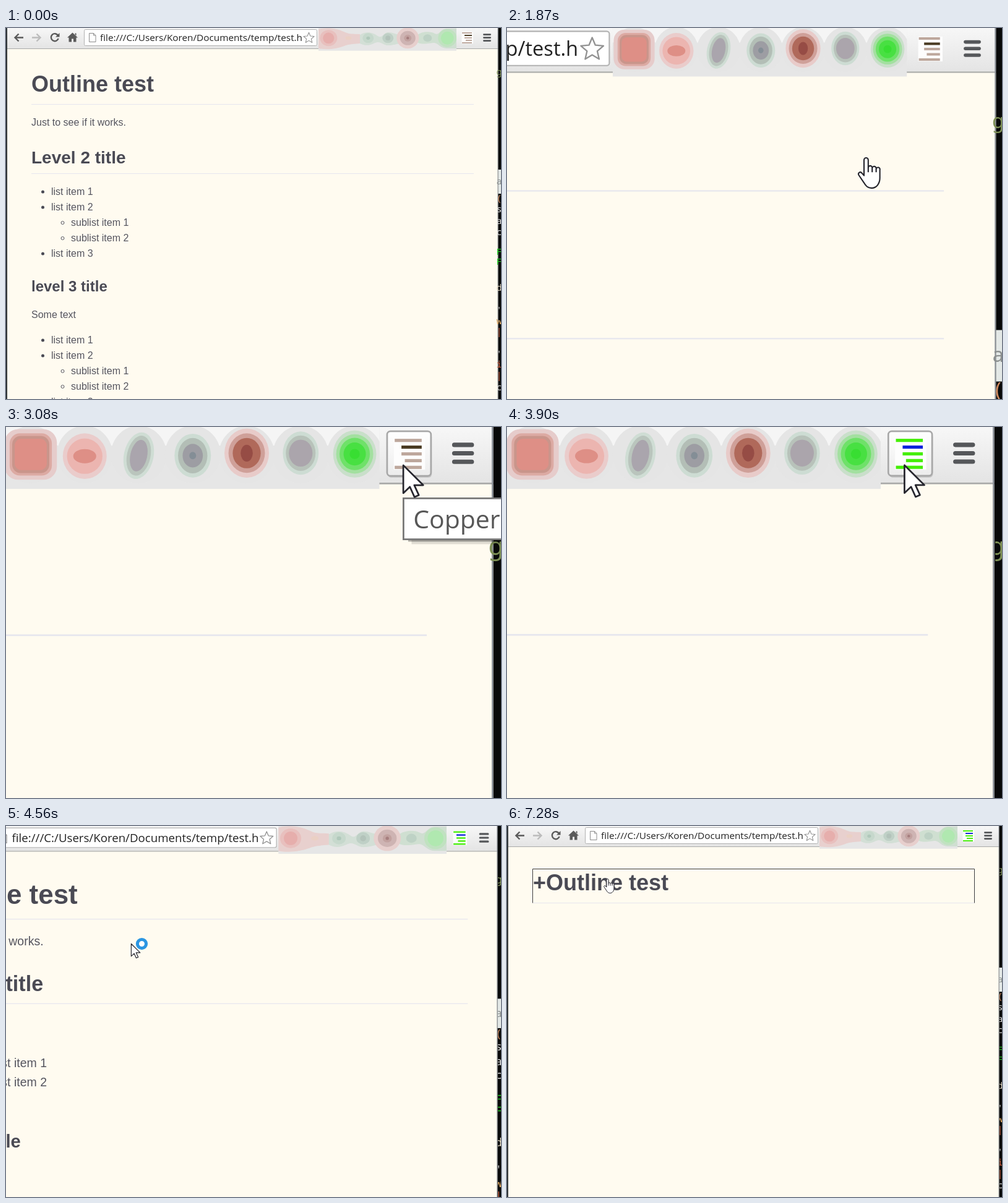
An HTML page that plays this animation: 800x600 px, repeating every 8000 ms.

```html
<!DOCTYPE html>
<html lang="en">
<head>
<meta charset="utf-8">
<title>Outline test</title>
<style>
html, body { margin: 0; width: 100%; height: 100%; overflow: hidden; background: #fffbf0; }
svg { display: block; width: 800px; height: 600px; }
.page { font: 16px "Liberation Sans", Arial, sans-serif; fill: #55555f; }
.page .h { font-weight: bold; fill: #4a4a54; }
.h1 { font-size: 36px; }
.h2 { font-size: 28px; }
.h3 { font-size: 24px; }
.rule { fill: #e6e6ee; }
.box { fill: none; stroke: #3c3c40; }
.ui { font: 15.3px "Open Sans", "Noto Sans", sans-serif; fill: #222; }
.tip { font: 15px "Open Sans", "Noto Sans", sans-serif; fill: #575757; }
.term { font: 15px "Noto Sans Mono", monospace; }
.ink { fill: none; stroke: #5a5a5a; stroke-width: 2.4; }
.cur { fill: #fff; stroke: #26262e; stroke-width: 1; stroke-linejoin: round; }
</style>
</head>
<body>
<svg viewBox="0 0 800 600">
  <defs>
    <linearGradient id="bar" x2="0" y2="1"><stop stop-color="#f7f7f7"/><stop offset="1" stop-color="#e4e4e4"/></linearGradient>
    <linearGradient id="btn" x2="0" y2="1"><stop stop-color="#fff"/><stop offset="1" stop-color="#ececec"/></linearGradient>
    <clipPath id="urlClip"><rect x="148" y="3" width="331" height="25"/></clipPath>
    <clipPath id="termClip"><rect x="796" width="4" height="600"/></clipPath>
    <clipPath id="stripClip"><rect x="505" width="223" height="36.8"/></clipPath>
  </defs>
  <g id="scene">
    <rect width="800" height="600" fill="#fffbf0"/>

    <g class="page">
      <g id="h1Open"><text class="h h1" x="41" y="103">Outline test</text><rect class="rule" x="41" y="123" width="715" height="1"/></g>
      <g id="h1Shut">
        <path class="box" d="M41.5 124.5V69.5H755.5V124.5"/><rect class="rule" x="42" y="124" width="713" height="1"/>
        <text class="h h1" x="42" y="104">+Outline test</text>
      </g>
      <g id="body">
        <text x="41" y="158">Just to see if it works.</text>
        <g id="h2Shut">
          <path class="box" d="M41.5 236.5V193.5H755.5V236.5"/><rect class="rule" x="42" y="236" width="713" height="1"/>
          <text class="h h2" x="42" y="220">+Level 2 title</text>
        </g>
        <g id="h2Open">
          <text class="h h2" x="41" y="219">Level 2 title</text>
          <rect class="rule" x="41" y="235" width="715" height="1"/>
          <text class="h h3" x="41" y="426">level 3 title</text>
          <text x="41" y="469">Some text</text>
          <g id="lists"></g>
        </g>
      </g>
    </g>

    <rect width="800" height="33" fill="url(#bar)"/>
    <rect y="33" width="796" height="1" fill="#a9aaa9"/>
    <g class="ink">
      <path d="M28 15.5H15M20.5 9.5l-6 6 6 6"/>
      <path d="M42 15.5H55M49.5 9.5l6 6-6 6" stroke="#bcbcbc"/>
      <path d="M84 12a6 6 0 1 0 .6 5"/>
      <path d="M86.5 8v6.500h-6.500z" fill="#5a5a5a" stroke="none"/>
      <path d="M107.500 7.500l8.500 8h-2.500v7h-4.500v-5h-3v5h-4.500v-7h-2.500zM111.500 8.500h2v4l-2-2z" fill="#5a5a5a" stroke="none"/>
    </g>
    <rect x="126.500" y="2.500" width="376" height="26" rx="2" fill="#fff" stroke="#b2b2b2"/>
    <path d="M134.500 8.500h7l3.500 3.500v10.500h-10.500zM141.500 8.500v3.500h3.500" fill="#fff" stroke="#8c8c8c"/>
    <text class="ui" x="152" y="21" clip-path="url(#urlClip)">file:///C:/Users/Koren/Documents/temp/test.html</text>
    <path id="star" fill="#fff" stroke="#929292" stroke-width="1.100" stroke-linejoin="round"/>

    <g clip-path="url(#stripClip)">
      <rect x="505" width="223" height="37" fill="#e6e6e6"/>
      <g id="soft"></g>
      <g id="vivid"><rect x="505" width="223" height="11" fill="#f5f5f5"/></g>
    </g>

    <g id="hover">
      <rect x="733" y="4" width="26" height="26" rx="2" fill="#000" opacity=".15"/>
      <rect x="732.500" y="2.500" width="26" height="26.500" rx="2" fill="url(#btn)" stroke="#a8a8a8"/>
    </g>
    <rect x="736.500" y="6.500" width="18.500" height="18.800" fill="#fdfdfd"/>
    <g id="bars"></g>
    <path d="M772.300 10.600h10.400M772.300 15.600h10.400M772.300 20.600h10.400" stroke="#55575a" stroke-width="2.600" stroke-linecap="round"/>

    <rect width="2" height="600" fill="#2f3538"/>
    <rect x="794.500" width="1" height="600" fill="#8d939a"/>
    <rect x="795.500" width="5" height="600" fill="#080909"/>
    <rect x="795.500" y="229" width="5" height="39" fill="#e3e8e6"/>
    <g id="term" class="term"></g>

    <g id="tip">
      <rect x="747" y="46" width="80" height="23.500" opacity=".12"/>
      <rect x="745" y="45" width="80" height="23" opacity=".3"/>
      <rect x="742.200" y="42.300" width="110" height="24.300" fill="#fff" stroke="#767676"/>
      <text class="tip" x="748" y="60">Copper Outline</text>
    </g>

    <g id="cursor">
      <path id="arrow" class="cur" d="M0 0V16.500l3.900-3.700 2.700 6 2.600-1.100-2.700-5.900h5.300z"/>
      <circle id="busy" cx="14" r="5.800" fill="#fff" stroke="#2b96e2" stroke-width="4.200"/>
      <g id="hand" class="cur" transform="translate(-6.600 0)">
        <path d="M5 14V2.200a1.600 1.600 0 0 1 3.200 0V8a1.500 1.500 0 0 1 3 .3 1.500 1.500 0 0 1 3 .6 1.400 1.400 0 0 1 2.800 .8V16c0 4-2.500 7.500-6.200 7.500-3 0-4.400-1.500-5.800-4L1 13.600c-.8-1.600 1-2.800 2.200-1.600z"/>
        <path d="M8.200 8v3.500M11.200 8.500v3M14.200 9v2.500" fill="none"/>
      </g>
    </g>
  </g>
</svg>
<script>
const $ = id => document.getElementById(id);

function add(parent, tag, attrs, text) {
  const el = document.createElementNS('http://www.w3.org/2000/svg', tag);
  for (const k in attrs) el.setAttribute(k, attrs[k]);
  if (text) el.textContent = text;
  return parent.appendChild(el);
}
const show = (id, on) => { $(id).style.display = on ? '' : 'none'; };
const clamp = v => Math.max(0, Math.min(1, v));
const ramp = (t, a, b) => clamp((t - a) / (b - a));
const ease = u => (1 - Math.cos(Math.PI * u)) / 2;

// Two nested bullet lists
const items = ['list item 1', 'list item 2', 'sublist item 1', 'sublist item 2', 'list item 3'];
for (const top of [270, 510]) items.forEach((label, i) => {
  const sub = label[0] === 's', x = sub ? 105 : 73, y = top + i * 25;
  add($('lists'), 'text', { x, y }, label);
  add($('lists'), 'circle', { cx: x - 13.5, cy: y - 5, r: 2.5, fill: sub ? 'none' : '#4a4a54', stroke: sub ? '#55555f' : 'none' });
});

$('star').setAttribute('d', 'M' + Array.from({ length: 10 }, (_, i) => {
  const r = i % 2 ? 4.1 : 9, a = i * Math.PI / 5;
  return (489.5 + r * Math.sin(a)).toFixed(2) + ' ' + (16.3 - r * Math.cos(a)).toFixed(2);
}).join('L') + 'z');

// Blurred toolbar buttons: rings of [rx, ry, colour], 32px apart
const slot = i => 521.3 + i * 32;
const ring = (g, i, [rx, ry, fill], cy = 16.3, turn = 0) =>
  add(g, 'ellipse', { cx: slot(i), cy, rx, ry, fill, transform: `rotate(${turn} ${slot(i)} ${cy})` });

const soft = $('soft');
add(soft, 'path', { d: 'M505 2C520-2 536 1 546 6S560 9 572 10V25C556 26 552 27 544 30S520 36 505 33z', fill: '#e8d0ce' });
add(soft, 'path', { d: 'M572 11C584 4 594 8 601 13S610 7 618 7 630 11 636 10V25C630 26 626 28 618 28S606 22 600 23 586 32 572 25z', fill: '#d3dfd6' });
add(soft, 'path', { d: 'M664 12C672 5 686 5 693 9S702 1 712 1H728V33H712C702 33 698 24 692 24S672 28 664 23z', fill: '#cfdfd1' });
[
  [[14, 13, '#e8c0be'], [9, 9, '#e6aeac']],
  [[5, 3, '#ead0c4']],
  [[9, 8, '#c6d8cc'], [3, 2.6, '#b0c8ba']],
  [[9, 8, '#bfd0c6'], [4, 4, '#b3c3ba']],
  [[18, 17, '#e7cfcd'], [12.5, 11.5, '#ceb4b3'], [6, 5.5, '#c2a2a0'], [2.2, 2.2, '#a67e7e']],
  [[7, 6, '#bed2c5']],
  [[15, 14.5, '#c0e2c0'], [10.5, 10.5, '#b0e8b0']]
].forEach((rings, i) => rings.forEach(r => ring(soft, i, r)));

const vivid = $('vivid');
for (let i = 0; i < 7; i++) ring(vivid, i, [16.5, 17, '#e5e5e5']);
[[15.5, 15, '#e6cccb', 8], [12.5, 12.5, '#dcaaa3', 6], [11, 11, '#c9958b', 5], [9.5, 9.3, '#de8f86', 4]].forEach(([w, h, fill, rx]) =>
  add(vivid, 'rect', { x: slot(0) - w, y: 16.3 - h, width: 2 * w, height: 2 * h, rx, fill }));
[
  [17.3, 0, [13, 13.5, '#eacccb'], [10.5, 10.5, '#ecb5b0'], [6.8, 4.2, '#de8f86']],
  [17, 12, [8.8, 14, '#cfddd4'], [7, 12, '#bac5bd'], [5, 9.5, '#aaa5ad']],
  [17, 0, [10.8, 13, '#cddcd3'], [8.7, 10.5, '#b3beb6'], [6, 7, '#9d9da3'], [2, 2.2, '#848e96']],
  [15.5, 0, [13.2, 14.6, '#e8cbc9'], [10.8, 11.7, '#cfa099'], [8.3, 9, '#b0695a'], [3.6, 5, '#964c45']],
  [15.5, 0, [10.6, 12.8, '#cddcd3'], [8.8, 10.5, '#b8c2ba'], [7, 8, '#aba5ac']],
  [16, 0, [12.8, 14, '#c9dfca'], [11, 11.7, '#a3e0a0'], [9, 9.6, '#6fe169'], [6.6, 6.8, '#48e042'], [3, 3, '#38de32']]
].forEach(([cy, turn, ...rings], i) => rings.forEach(r => ring(vivid, i + 1, r, cy, turn)));

const bars = [737, 741, 741, 743, 737].map((x, i) =>
  add($('bars'), 'rect', { x, y: 7 + i * 4, width: 753 - x, height: 1.9 }));

[['g', 76, '#7d8f55'], ['a', 253, '#8b8f8e'], ['(', 280, '#d08a60'], ['s', 298, '#ddd'], ['a', 317, '#ddd'], ['c', 335, '#ddd'],
 ['F', 367, '#1fc81f'], ['F', 383, '#1fc81f'], ['d', 425, '#e0d6c0'], ["'", 461, '#ccc'], ['w', 479, '#e0a860'], ['|', 496, '#d06040'],
 ["'", 532, '#ccc'], ['i', 549, '#d06040'], ['|', 567, '#d06040'], ['c', 586, '#ddd']]
  .forEach(([ch, y, fill]) => add($('term'), 'text', { x: 792.5, y, fill }, ch));

// Pointer tip: [ms, x, y]
const path = [[730, 400, 602], [1450, 579.5, 200], [1870, 697, 98], [2330, 722, 30], [2540, 742.1, 22.7], [4190, 742.1, 22.7],
  [4560, 310.6, 156], [4860, 153, 212], [6450, 153, 212], [6700, 154, 110], [6880, 154, 110], [7050, 162.5, 85]];

function pointer(t) {
  let i = path.findIndex(p => p[0] > t);
  if (i < 0) return path[path.length - 1].slice(1);
  if (!i) return path[0].slice(1);
  const a = path[i - 1], b = path[i], u = ramp(t, a[0], b[0]);
  return [a[1] + (b[1] - a[1]) * u, a[2] + (b[2] - a[2]) * u];
}

function draw(t) {
  const s = 1 + 1.727 * (ease(ramp(t, 1330, 2230)) - ease(ramp(t, 3870, 4770)));
  $('scene').setAttribute('transform', `translate(${800 - 800 * s} 0) scale(${s})`);

  const k = ramp(s, 1.25, 1.8);
  soft.style.opacity = 1 - k;
  vivid.style.opacity = k;

  const on = t >= 3770;
  bars.forEach((b, i) => b.setAttribute('fill', i === 1 ? (on ? '#0d22dc' : '#493a22') : (on ? '#45ee08' : '#bda79c')));
  show('hover', t >= 2480 && t < 4230);
  $('tip').style.opacity = ramp(t, 2890, 3080) - ramp(t, 3230, 3510);
  if (t >= 3300) $('term').setAttribute('clip-path', 'url(#termClip)');
  else $('term').removeAttribute('clip-path');

  const h1Shut = t >= 7280, h2Shut = t >= 5460 && t < 6360;
  show('h1Open', !h1Shut);
  show('h1Shut', h1Shut);
  show('body', !h1Shut);
  show('h2Open', !h2Shut);
  show('h2Shut', h2Shut);

  const [x, y] = pointer(t);
  const busy = t >= 4300 && t < 4800;
  const hand = !busy && (y > 69 && y < 124 || y > 181 && y < 236);
  show('cursor', t >= 730);
  show('hand', hand);
  show('arrow', !hand);
  show('busy', busy);
  $('cursor').setAttribute('transform', `translate(${x} ${y})`);
}

const start = performance.now();
function tick() {
  draw((performance.now() - start) % 8000);
  requestAnimationFrame(tick);
}
tick();
</script>
</body>
</html>
```
